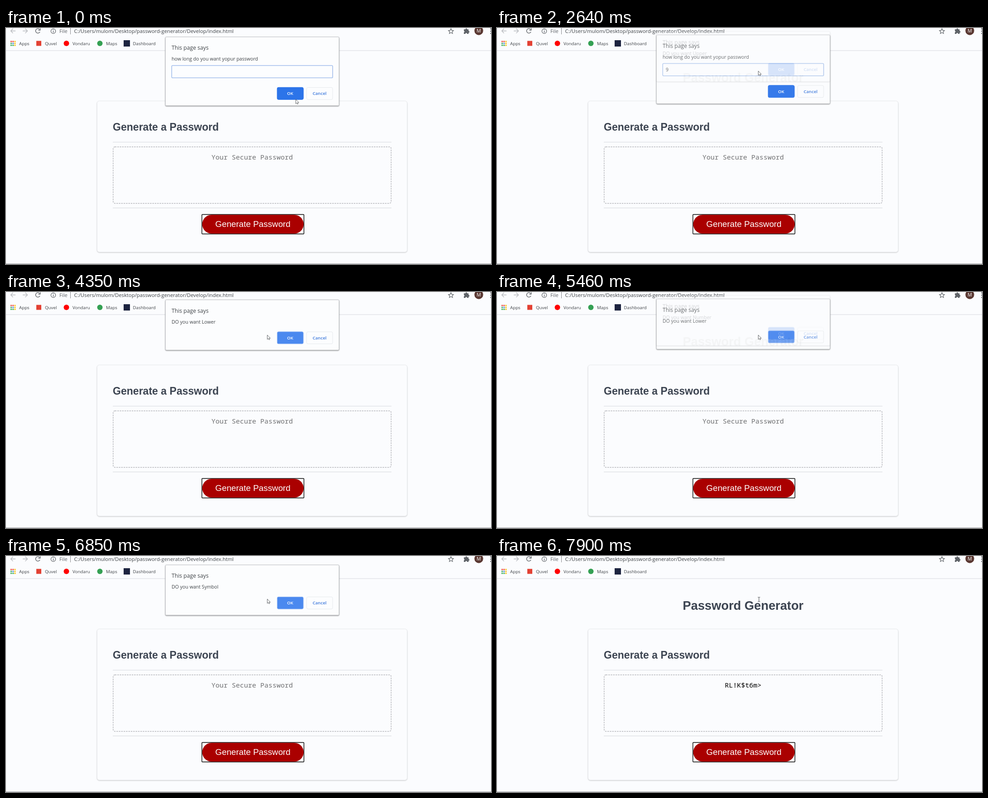
Animation, 1072 px wide and 522 px high, one loop 8 s. Source, as an HTML page:

```html
<!DOCTYPE html>
<html lang="en">
<head>
<meta charset="utf-8">
<title>Password Generator</title>
<style>
  html, body { margin: 0; width: 100%; height: 100%; overflow: hidden; background: #fbfcfe; }
  svg { display: block; width: 1072px; height: 522px; }
  text { font-family: "Open Sans", "Noto Sans", sans-serif; fill: #3f4347; }
  .arial { font-family: "Liberation Sans", Arial, sans-serif; fill: #3c4451; }
  .bold { font-weight: 700; }
  .mid { text-anchor: middle; }
  .mono { font: 15px "Noto Sans Mono", "DejaVu Sans Mono", monospace; }
  .bar { font-size: 11.33px; }
  .mark { font-size: 9.75px; }
  .label { font-size: 9.6px; font-weight: 600; text-anchor: middle; }
  .line { fill: none; stroke: #5f6368; stroke-width: 1.4; }
  .card { fill: #fbfcfe; stroke: #e9ebee; filter: drop-shadow(0 1px 1px #0003); }
  .panel { fill: #fcfdfe; stroke: #c3c5c8; filter: drop-shadow(0 1.2px 1px #0007); }
</style>
</head>
<body>
<svg viewBox="0 0 1072 522">
  <!-- browser bar -->
  <path class="line" style="stroke:#b9bbbf" d="M21 6.5H10.5M15.5 1.5l-5 5 5 5M37 6.5H47.5M42.5 1.5l5 5-5 5"/>
  <path class="line" d="M74.5 3.4A5 5 0 1 0 75 8.5M75.7 .8V4.8H71.5"/>
  <circle class="line" cx="104.5" cy="7" r="5.2" style="stroke-width:1.2"/>
  <path class="line" d="M104.5 6.2V10M104.5 3.8V5.1"/>
  <text class="bar" x="118" y="11" style="fill:#5f6368">File</text>
  <path d="M142.5 0V14" stroke="#85888c"/>
  <text class="bar" x="150.5" y="11">C:/Users/mulom/Desktop/password-generator/Develop/index.html</text>
  <path class="line" style="stroke-width:1.2" d="M983.5 1.5l1.6 3.7 4 .4-3 2.7.9 3.9-3.5-2.1-3.5 2.1.9-3.9-3-2.7 4-.4z"/>
  <path fill="#5f6368" d="M1012 3h3.4a2 2 0 0 1 4 0h3v3.4a2 2 0 0 1 0 4V13h-3.2a1.9 1.9 0 0 0-3.8 0H1012V9.7a1.9 1.9 0 0 0 0-3.6z"/>
  <circle cx="1045" cy="6" r="9.7" fill="#5a3832"/>
  <text class="mid" x="1045" y="10.2" style="fill:#fff;font-size:10.5px">M</text>
  <path d="M1071.5 2v.1M1071.5 7v.1M1071.5 12v.1" stroke="#5f6368" stroke-width="2.4" stroke-linecap="round"/>
  <g id="apps"></g>
  <rect x="67" y="28.5" width="11" height="11" fill="#e34133"/>
  <circle cx="133.5" cy="34" r="6" fill="#f00"/>
  <circle cx="207.5" cy="34" r="6" fill="#34a053"/>
  <rect x="260" y="27" width="14" height="14" fill="#1d2440"/>
  <g class="mark">
    <text x="29" y="37.8">Apps</text>
    <text x="86" y="37.8">Quvel</text>
    <text x="147" y="37.8">Vondaru</text>
    <text x="221" y="37.8">Maps</text>
    <text x="280.5" y="37.8">Dashboard</text>
  </g>
  <path d="M0 50H1072" stroke="#e3e5e9" stroke-width="1.4"/>
  <path d="M0 521.5H1072" stroke="#a0a2a5"/>

  <!-- page -->
  <text class="arial bold mid" x="544" y="119" font-size="27.3">Password Generator</text>
  <rect class="card" x="201.5" y="161.5" width="685" height="334" rx="5"/>
  <text class="arial bold" x="236" y="227" font-size="23.05">Generate a Password</text>
  <path d="M236 252.5H852M236 398H852" stroke="#e1e3e6" stroke-width="1.7"/>
  <rect x="236.8" y="262.8" width="614.5" height="125" rx="4" fill="none" stroke="#bfc0c4" stroke-width="1.7" stroke-dasharray="3.4 1.9"/>
  <text id="result" class="mono mid" x="544" y="291"></text>
  <rect x="433" y="412.5" width="225.5" height="43" rx="1" fill="#fff" stroke="#000" stroke-width="1.4"/>
  <rect x="433.7" y="413.2" width="224.2" height="41.6" rx="20.8" fill="#a00"/>
  <text class="arial mid" x="545.7" y="440.3" font-size="18.82" style="fill:#fff">Generate Password</text>

  <g id="dialogs"></g>
  <path id="caret" stroke="#333" d="M0 89.5V103"/>
  <path id="arrow" fill="#fff" stroke="#55585c" stroke-width=".9" d="M0 0V9.8L2.3 7.8 3.8 10.8 5.2 10.2 3.9 7.3H6.8Z"/>
  <path id="beam" fill="none" stroke="#44474b" d="M-2.5-4.8H-.7L0-4.2 .7-4.8H2.5M0-4.2V4.2M-2.5 4.8H-.7L0 4.2 .7 4.8H2.5"/>
</svg>
<script>
const $ = id => document.getElementById(id);
const LOOP = 8000;

const dots = ['#ea4335', '#ea4335', '#fbbc04', '#34a853', '#4285f4', '#fbbc04', '#34a853', '#34a853', '#fbbc04'];
$('apps').innerHTML = dots.map((color, i) =>
  `<rect x="${10 + i % 3 * 4.2}" y="${28.5 + Math.floor(i / 3) * 4.2}" width="2.8" height="2.8" fill="${color}"/>`).join('');

function dialog(id, message) {
  const prompt = id === 'length';
  const top = prompt ? 131 : 90;
  const field = `<rect x="366.3" y="83" width="355.7" height="27.3" rx="2" fill="#fcfdff" stroke="#a3bfec" stroke-width="1.6"/>
    <text id="typed" x="373" y="100.3" font-size="10.6"></text>`;
  return `<g id="${id}">
    <rect class="panel" x="352.5" y="19.8" width="383.5" height="${prompt ? 152 : 111}" rx="2"/>
    <text x="366" y="48" font-size="12.2">This page says</text>
    <text x="366" y="72" font-size="10.6">${message}</text>
    ${prompt ? field : ''}
    <rect x="599.3" y="${top + .3}" width="58" height="27" rx="3" fill="${prompt ? '#2c74e9' : '#4b89ef'}" stroke="${prompt ? '#2c74e9' : '#a9c5f5'}"/>
    <text class="label" x="628" y="${top + 17.2}" style="fill:#fff">OK</text>
    <rect x="664.5" y="${top + .5}" width="57.5" height="26.7" rx="3" fill="none" stroke="#e6e9ed"/>
    <text class="label" x="693" y="${top + 17.2}" style="fill:#3b78dc">Cancel</text>
  </g>`;
}

const questions = {
  length: 'how long do you want yopur password',
  upper: 'DO you want Upper',
  lower: 'DO you want Lower',
  number: 'DO you want Number',
  symbol: 'DO you want Symbol'
};
$('dialogs').innerHTML = Object.entries(questions).map(q => dialog(...q)).join('');

// Dialog poses: { id: [vertical shift, opacity] }
const still = id => ({ [id]: [0, 1] });
const landing = id => ({ [id]: [-2.5, 1] });
const swap = (from, to) => ({ [from]: [-4.5, .95], [to]: [-12.5, .2] });

const poses = [
  [0, still('length')],
  [2640, swap('length', 'upper')], [2800, still('upper')],
  [4350, landing('lower')], [4470, still('lower')],
  [5460, swap('lower', 'number')], [5580, still('number')],
  [6580, swap('number', 'symbol')], [6700, landing('symbol')], [6850, still('symbol')],
  [7780, { symbol: [-4.5, .85] }], [7900, {}]
];
const pointers = [
  [0, ['arrow', 640.5, 157.7]], [150, ['arrow', 602.5, 128]],
  [300, ['beam', 588, 108]], [420, ['beam', 581, 99]], [540, ['beam', 579, 96]],
  [2640, ['arrow', 577.5, 95]], [7900, ['beam', 579, 96]]
];
const carets = [[0, 0], [150, 373.5], [540, 0], [1130, 373.5], [1560, 379.5], [2080, 0]];

const at = (steps, t) => steps.findLast(([start]) => start <= t)[1];
const show = (el, visible) => el.setAttribute('display', visible ? 'inline' : 'none');

function draw() {
  const t = performance.now() % LOOP;

  const pose = at(poses, t);
  for (const id in questions) {
    const [dy, opacity] = pose[id] || [0, 0];
    $(id).setAttribute('transform', `translate(0 ${dy})`);
    $(id).setAttribute('opacity', opacity);
  }

  const [kind, x, y] = at(pointers, t);
  for (const id of ['arrow', 'beam']) show($(id), id === kind);
  $(kind).setAttribute('transform', `translate(${x} ${y})`);

  const caretX = at(carets, t);
  show($('caret'), caretX);
  $('caret').setAttribute('transform', `translate(${caretX} 0)`);
  $('typed').textContent = t >= 1560 ? '9' : '';

  const done = t >= 7780;
  $('result').textContent = done ? 'RL!K$t6m>' : 'Your Secure Password';
  $('result').style.fill = done ? '#000' : '#707173';

  requestAnimationFrame(draw);
}
draw();
</script>
</body>
</html>
```
